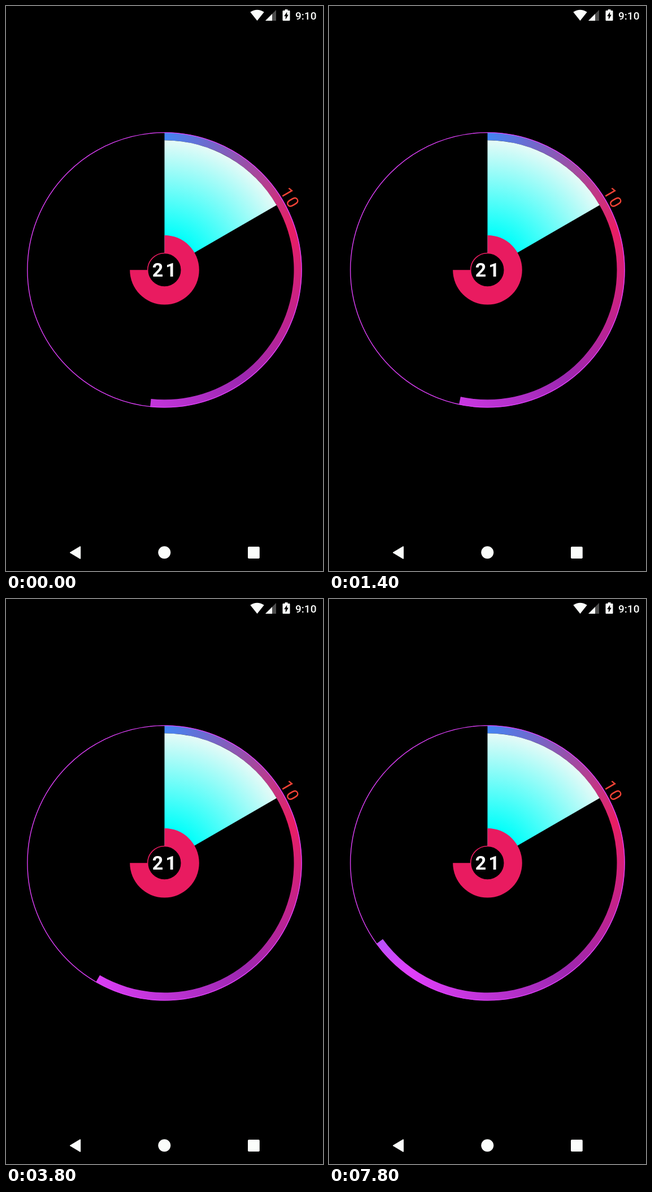
An HTML page that plays this animation: 561 px wide and 998 px high, repeating every 8000 ms.

```html
<!DOCTYPE html>
<html lang="en">
<head>
<meta charset="utf-8">
<title>Clock dial</title>
<style>
  html, body { margin: 0; width: 100%; height: 100%; overflow: hidden; background: #000; }
  #sweep, svg { position: absolute; left: 0; top: 0; width: 561px; height: 998px; }
  #sweep {
    background: conic-gradient(from 0deg at 280.5px 466.25px,
      #4285f4 0deg, #e91e63 72deg, #9c27b0 144deg, #e040fb 216deg, #4285f4 288deg);
  }
  text { font-family: Roboto, sans-serif; }
</style>
</head>
<body>
<div id="sweep"></div>
<svg viewBox="0 0 561 998">
  <defs>
    <radialGradient id="glow" gradientUnits="userSpaceOnUse" cx="0" cy="0" r="229">
      <stop offset=".26" stop-color="#00fffa"/>
      <stop offset="1" stop-color="#e6faf7"/>
    </radialGradient>
  </defs>

  <g transform="translate(280.5 466.25)">
    <circle r="242.6" fill="none" stroke="#e040fb" stroke-width="1.4"/>
    <path id="hour" fill="url(#glow)"/>
    <path id="core" fill="#e91b60"/>
    <circle r="29.8" fill="#000" stroke="#e91b60" stroke-width="1.6"/>
    <text x="-21.8" y="12.2" font-size="34" font-weight="700" letter-spacing="4" fill="#fff">21</text>
    <text transform="rotate(60)" x="1.5" y="-246" font-size="29" letter-spacing="2.9"
      text-anchor="middle" fill="#f44336">10</text>
  </g>

  <g fill="#fbfdfb">
    <path d="M444.5 26 L432.3 10.8 Q444.5 2.6 456.7 10.8Z"/>
    <path d="M478 7V26H459Z" fill="#4d4d4d"/>
    <path d="M471 14V26H459Z"/>
    <path d="M493.5 6h5v2h2.8q1.2 0 1.2 1.2v15.6q0 1.2-1.2 1.2h-10.6q-1.2 0-1.2-1.2v-15.6q0-1.2 1.2-1.2h2.8Z"/>
    <path d="M497.2 10.5v5h2.6l-5 8.5v-6h-2.6Z" fill="#000"/>
    <text x="512" y="24" font-size="19" font-weight="500">9:10</text>
    <path d="M114 965.5L131.2 955.3V975.7Z" stroke="#fbfdfb" stroke-width="2" stroke-linejoin="round"/>
    <circle cx="280.3" cy="965.2" r="11"/>
    <rect x="428" y="955" width="20.8" height="21" rx="1.8"/>
  </g>
</svg>
<script>
  const CX = 280.5, CY = 466.25, LOOP = 8000;
  const $ = id => document.getElementById(id);

  // Ring sector from twelve o'clock, clockwise to the given angle in degrees.
  function sector(deg, inner, outer, cx = 0, cy = 0) {
    const a = deg * Math.PI / 180, big = deg > 180 ? 1 : 0;
    const at = r => `${cx + r * Math.sin(a)} ${cy - r * Math.cos(a)}`;
    return `M${cx} ${cy - outer}A${outer} ${outer} 0 ${big} 1 ${at(outer)}` +
      `L${at(inner)}A${inner} ${inner} 0 ${big} 0 ${cx} ${cy - inner}Z`;
  }

  $('hour').setAttribute('d', sector(60, 30, 229));
  $('core').setAttribute('d', sector(270, 29, 61.3));

  let shown = -1;
  function draw(t) {
    // The first tick comes just before 800 ms, then one every second.
    const second = 31 + Math.floor((t % LOOP + 210) / 1000);
    if (second === shown) return;
    shown = second;
    $('sweep').style.clipPath = `path("${sector(second * 6, 229, 243, CX, CY)}")`;
  }

  const start = performance.now();
  function frame() {
    draw(performance.now() - start);
    requestAnimationFrame(frame);
  }
  frame();
</script>
</body>
</html>
```
